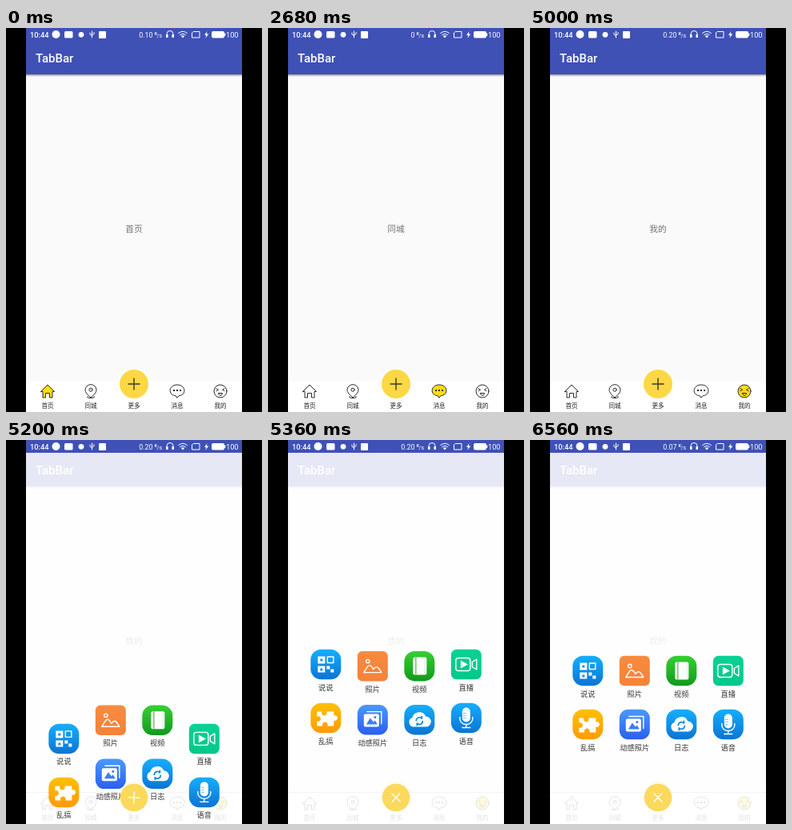
An HTML page for the animation above (8 s loop, 320 by 480 pixels).

```html
<!DOCTYPE html>
<html lang="zh">
<head>
<meta charset="utf-8">
<title>TabBar</title>
<style>
  html, body { margin: 0; width: 100%; height: 100%; overflow: hidden; background: #000; }
  svg { display: block; width: 100vw; height: 100vh; }
  text { font-family: Roboto, "Noto Sans CJK SC", "Noto Sans CJK", sans-serif; }
  .mid { text-anchor: middle; }
  .line { fill: none; stroke: #fff; stroke-width: 1.4; stroke-linecap: round; stroke-linejoin: round; }
  .thin { stroke-width: 1; }
  .tab { stroke: #2b2b2b; stroke-width: 1; stroke-linejoin: round; stroke-linecap: round; }
  .tab .bare { fill: none; }
  .tab .dot { fill: #2b2b2b; stroke: none; }
</style>
</head>
<body>
<svg viewBox="0 0 320 480">
  <defs>
    <linearGradient id="shadow" x2="0" y2="1">
      <stop stop-color="#9a9a9e"/><stop offset="1" stop-color="#fafafa"/>
    </linearGradient>
    <clipPath id="screen"><rect x="25" width="270" height="480"/></clipPath>
  </defs>
  <rect width="320" height="480"/>
  <g clip-path="url(#screen)">
    <rect x="25" width="270" height="480" fill="#fafafa"/>
    <rect x="25" y="16" width="270" height="42" fill="#3f51b5"/>
    <rect x="25" y="58" width="270" height="3" fill="url(#shadow)"/>
    <text x="37" y="43" font-size="15" font-weight="500" fill="#fff">TabBar</text>

    <text id="page" class="mid" x="160" y="254.5" font-size="10.7" fill="#757575"></text>
    <rect x="25" y="441" width="270" height="39" fill="#fff"/>
    <circle cx="160" cy="445" r="20" fill="#fff"/>
    <g id="tabs"></g>
    <circle cx="160" cy="445" r="18" fill="#fdd845"/>
    <path d="M152.5 445h15M160 437.5v15" stroke="#3c3824" stroke-width="1.4"/>

    <g id="veil">
      <rect x="25" y="16" width="270" height="464" fill="#fff" opacity=".87"/>
      <path d="M25 440.5h270" stroke="#f3f3f5"/>
      <g id="menu"></g>
      <circle cx="160" cy="447" r="17.3" fill="#fbd95c"/>
      <path id="cross" class="line" d="M-7 0H7M0 -7V7"/>
    </g>

    <rect x="25" width="270" height="16" fill="#3f51b5"/>
    <g fill="#fff">
      <text x="30" y="12" font-size="9.3" font-weight="500">10:44</text>
      <circle cx="62.5" cy="8" r="5"/>
      <rect x="73" y="4" width="10.5" height="8.5" rx="1.5"/>
      <circle cx="94" cy="8.3" r="3.4"/>
      <rect x="116" y="4" width="9" height="9" rx="1"/>
      <g class="line thin">
        <path d="M107.5 4V12M105 6v2l2.5 2M110 5.5v2l-2.5 1.5"/>
        <path d="M201 9V7.5a4 4 0 0 1 8 0V9"/>
        <path d="M215.5 6.5q5.5-4.5 11 0M217.5 8.7q3.5-2.8 7 0"/>
        <path d="M234.5 4.5H242V12H232.5V6.5Z"/>
      </g>
      <path d="M200 8h2.5v4H200ZM207.5 8h2.5v4h-2.5ZM218.8 10q2.2-1.6 4.4 0l-2.2 2.6ZM251.5 4l-3.5 5h2.3l-1 3.7 4-5.2h-2.5Z"/>
      <rect x="257" y="4" width="16" height="8.5" rx="2"/>
      <rect x="273" y="6.5" width="1.3" height="3.5"/>
      <text x="275" y="12" font-size="9.2">100</text>
      <text id="speed" x="183.5" y="12" font-size="8.9" text-anchor="end"></text>
      <text x="185.5" y="8.7" font-size="5.8" font-weight="500">K</text>
      <text x="188.5" y="12" font-size="7">/s</text>
    </g>
  </g>
</svg>
<script>
const $ = id => document.getElementById(id);
const LOOP = 8000, STEP = 40;

// Each tab icon is drawn around its own centre; .body takes the selected fill.
const tabs = [
  ['首页', 52, `<path class="body" d="M-8.5 .5L0-8 8.5 .5H6V8H2.5V2.5H-2.5V8H-6V.5Z"/>`],
  ['同城', 106, `<path class="bare" d="M-4 6.5q-2 2 4 2t4-2"/>
    <path class="body" d="M0 8Q-7 2.5-7-1.5A7 6.8 0 0 1 7-1.5Q7 2.5 0 8Z"/><circle class="bare" cy="-1.8" r="2.1"/>`],
  ['更多', 160, ''],
  ['消息', 214, `<path class="body" d="M-2 5.8C-12 5-11-8 0-8S12 5 2 5.8L0 8Z"/>
    <path class="dot" d="M-5-2h2v2h-2ZM-1-2h2v2h-2ZM3-2h2v2h-2Z"/>`],
  ['我的', 268, `<circle class="body" r="8"/><path class="bare" d="M-5-3.2l2.5 1.5-2.5 1.3M5-3.2L2.5-1.7 5-.4"/>
    <path class="bare" d="M-2.5 2.5h5Q2 5.5 0 5.5T-2.5 2.5Z"/>`]
];

$('tabs').innerHTML = tabs.map(([label, x, art]) =>
  `<g class="tab" transform="translate(${x} 454)">${art}</g>
   <text class="mid" x="${x}" y="474.5" font-size="7.6" fill="#222">${label}</text>`).join('');
const bodies = [...document.querySelectorAll('.tab')].map(g => g.querySelector('.body'));

// label, top colour, bottom colour, corner radius, art
const menu = [
  ['说说', '#16aefc', '#0b74d4', 13, `<path fill="#fff" d="M-10-10h9v9h-9ZM-10 2h9v8h-9ZM1 2h4v4H1ZM6 6h4v4H6Z"/>
    <path class="line" d="M2-9.5H9.5V-2H2Z"/><path fill="#1292e6" d="M-7-7h3v3h-3ZM-7 5h3v3h-3Z"/>`],
  ['照片', '#f88b3e', '#f5823a', 6, `<path class="line" d="M-11 8Q-6-1-4-1T1 4Q3 1 5 1T11 8Z"/><circle class="line" cx="-6" cy="-6" r="2.2"/>`],
  ['视频', '#35d032', '#109a1c', 13, `<rect x="-8" y="-11" width="17" height="22" rx="2" fill="#fff"/>
    <path d="M-4.5-11v22" stroke="#6cc267" stroke-width="1.4"/><path d="M7-10v20" stroke="#dde3dd"/>`],
  ['直播', '#08d295', '#00c88a', 7, `<rect class="line" x="-13" y="-8" width="18" height="16" rx="3"/>
    <path class="line" d="M7.5-3L13-6.5V6.5L7.5 3Z"/><path fill="#fff" d="M-7-5L2 0-7 5Z"/>`],
  ['乱搞', '#ffc000', '#ff9a08', 13, `<path fill="#fff" d="M-11-8h6a3.4 3.4 0 1 0 6 0H10v5a3.3 3.3 0 1 1 0 6V10H2a3.4 3.4 0 1 0-6 0h-7V4a3.3 3.3 0 1 0 0-6Z"/>`],
  ['动感照片', '#4a98ff', '#2b5fee', 11, `<path class="line" d="M-7-10H11V5"/><rect x="-11" y="-7" width="19" height="16" rx="2" fill="#fff"/>
    <path fill="#3c7cf6" d="M-8 6L-3-2 1 3 3 1 6 6Z"/><circle cx="3" cy="-3" r="1.5" fill="#3c7cf6"/>`],
  ['日志', '#16aefc', '#0b74d4', 13, `<path fill="#fff" d="M-8 9a6 6 0 0 1-1-11.5A9 9 0 0 1 8-4 6.5 6.5 0 0 1 8 9Z"/>
    <path class="line" style="stroke:#0f8de4;stroke-width:1.8" d="M-4 1A4 4 0 0 1 3-1.5V-4M4 2A4 4 0 0 1-3 4.5V7"/>`],
  ['语音', '#16aefc', '#0b74d4', 13, `<rect x="-5" y="-13" width="10" height="18" rx="5" fill="#fff"/>
    <path class="line" d="M-8-1V1A8 7 0 0 0 8 1V-1M0 8v4M-5 12H5"/><path d="M-4-6h4M-4-3h4M-4 0h4" stroke="#7cc6f6"/>`]
];

$('menu').innerHTML = menu.map(([label, top, bottom, radius, art], i) =>
  `<g><linearGradient id="paint${i}" x2="0" y2="1"><stop stop-color="${top}"/><stop offset="1" stop-color="${bottom}"/></linearGradient>
   <rect x="-19" y="-18.7" width="38" height="37.5" rx="${radius}" fill="url(#paint${i})"/>${art}
   <text class="mid" y="32" font-size="9.2" fill="#333">${label}</text></g>`).join('');
const items = [...$('menu').children];

const progress = (t, start, length) => Math.max(0, Math.min(1, (t - start) / length));
const smooth = p => (1 - Math.cos(Math.PI * p)) / 2;
const pick = (t, steps) => steps.filter(([start]) => t >= start).pop()[1];

// Rise with a small overshoot
function drop(t, start) {
  const q = 1 - progress(t, start, 300);
  return 292 * q * q * (2 * q - 1);
}

function draw(time) {
  const t = Math.floor(time / STEP) * STEP;
  const selected = pick(t, [[0, 0], [1800, 1], [2680, 3], [3360, 4]]);
  const page = pick(t, [[0, 0], [1840, 1], [2720, 3], [3400, 4]]);

  $('speed').textContent = pick(t, [[0, '0.10'], [1360, '0'], [3560, '0.20'], [6560, '0.07']]);
  $('page').textContent = tabs[page][0];
  bodies.forEach((body, i) => body && body.setAttribute('fill', i === selected ? '#ffdc12' : '#fff'));
  $('veil').setAttribute('opacity', progress(t, 5080, 100));

  items.forEach((item, i) => {
    const column = i % 4;
    const start = column % 3 ? 5113 : 5126.5;
    const y = 288.5 + 67 * (i >> 2) + drop(t, start);
    item.setAttribute('transform', `translate(${72.3 + 58.5 * column} ${y})`);
  });
  const turn = 45 * smooth(progress(t, 5160, 240));
  $('cross').setAttribute('transform', `translate(160 447) rotate(${turn})`);
}

function tick() {
  draw(performance.now() % LOOP);
  requestAnimationFrame(tick);
}
tick();
</script>
</body>
</html>
```
